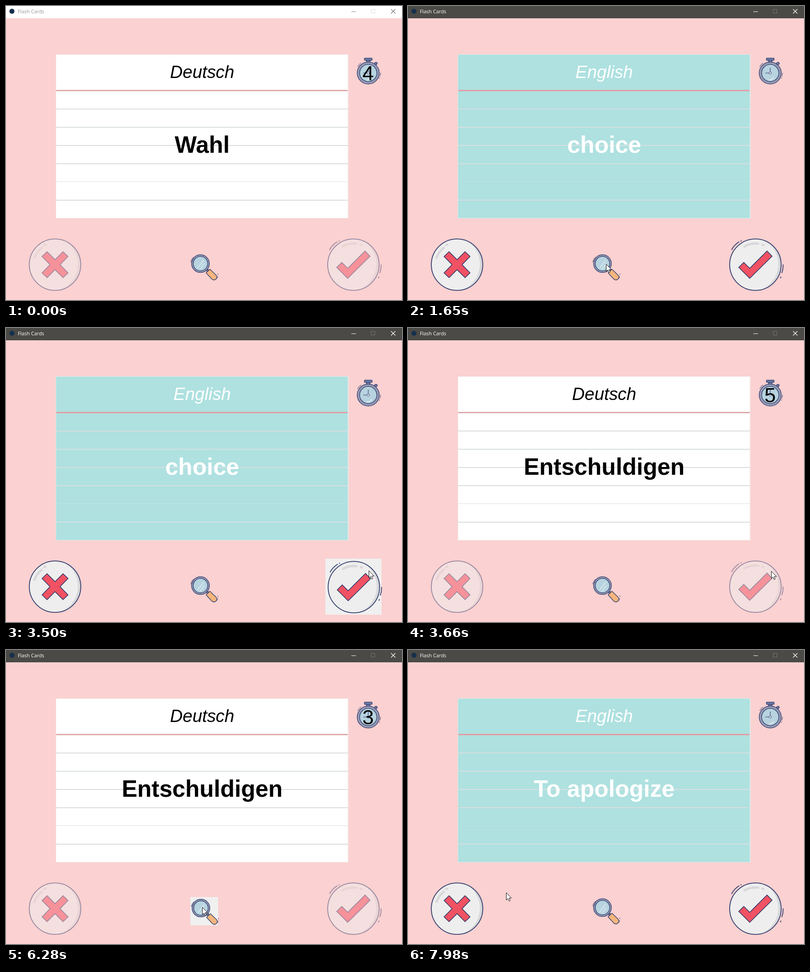
Write an HTML page that moves like this. It is 868x645 px and loops after 8 s.

```html
<!DOCTYPE html>
<html lang="en">
<head>
<meta charset="utf-8">
<title>Flash Cards</title>
<style>
  html, body { margin: 0; width: 100%; height: 100%; overflow: hidden; background: #fbd1d1; }
  svg { display: block; width: 100%; height: 100%; }
  text { font-family: "Liberation Sans", Arial, sans-serif; text-anchor: middle; }
  #caption { font: 10.8px "Open Sans", "Noto Sans", sans-serif; text-anchor: start; }
  #lang { font-size: 38.4px; font-style: italic; }
  #word { font-size: 51.2px; font-weight: bold; }
  #count { font-size: 44.8px; }
  .crisp { shape-rendering: crispEdges; }
  .ink { stroke: #303c6c; stroke-linecap: round; stroke-linejoin: round; }
  .line { fill: none; }
</style>
</head>
<body>
<svg viewBox="0 0 868 645" preserveAspectRatio="none">
  <defs>
    <pattern id="stipple" width="2" height="2" patternUnits="userSpaceOnUse" patternTransform="scale(.96)">
      <path d="M0 0h1v1h1v1h-1v-1h-1z" fill="#fbd1d1"/>
    </pattern>
    <g id="disc">
      <circle r="56.4" fill="#eeeeee"/>
      <path d="M24-51A56.4 56.4 0 0 1 10 55.5A60.2 60.2 0 0 0 24-51z" fill="#d8d8db"/>
      <circle class="ink line" r="56.4" stroke-width="1.8"/>
    </g>
  </defs>

  <rect width="868" height="645" fill="#fbd1d1"/>

  <rect id="bar" class="crisp" width="868" height="27"/>
  <circle cx="13" cy="11.5" r="5.5" fill="#15304c"/>
  <text id="caption" x="26" y="16.4">Flash Cards</text>
  <path id="min" class="crisp" d="M757 12.5h10" fill="none"/>
  <path id="max" class="crisp" d="M800.5 7.5h8v8h-8z" fill="none"/>
  <path id="close" d="M844 7l9.5 9.5M853.5 7l-9.5 9.5" fill="none" stroke-width="1.2"/>

  <g class="crisp">
    <rect id="edge" x="109" y="106" width="642" height="360"/>
    <rect id="card" x="110" y="107" width="639" height="358"/>
    <rect id="rule" x="110" y="184" width="639" height="3"/>
    <path id="rows" d="M110 226h639m-639 40h639m-639 40h639m-639 40h639m-639 80h639" stroke-width="2"/>
    <path id="faint" d="M110 385.5h639" stroke-width="1"/>
  </g>
  <text id="lang" x="430" y="158.2"></text>
  <text id="word" x="430" y="322.2"></text>

  <g class="ink" stroke-width="1.3">
    <path d="M790 118h8v6h-8z" fill="#7780a5"/>
    <rect x="785.5" y="114.5" width="17" height="4.5" rx="1" fill="#7587b0"/>
    <path d="M806 128l3-4q4-2 5 2l-4 5z" fill="#7780a5"/>
    <circle cx="794" cy="147" r="24.2" fill="#969bb5"/>
    <circle cx="794" cy="147" r="18.8" fill="#b7d3df"/>
    <path class="line" d="M794 147v-11.5M794 147h-10.5" stroke-width="1.1"/>
    <circle cx="794" cy="147" r="2.4" fill="#fff" stroke-width="1"/>
    <path class="line" d="M791 162q8 0 11-6" style="stroke:#eef5f8" stroke-width="1.4"/>
    <path class="line" d="M771 133q2-5 7-8M773.5 134q2-4 5-6M821 147q0 4-1.5 7M819 157l-1 2" stroke-width="1"/>
  </g>
  <text id="count" x="793.6" y="163"></text>

  <g transform="translate(107.5 567.5)">
    <use href="#disc"/>
    <path class="line" d="M-45-15Q-40-29-29-37M-23.5-43l2-1" stroke="#d8d8db" stroke-width="5" stroke-linecap="round"/>
    <path class="ink" d="M-28.5-18L-17.5-28.5L0-11L17.5-28.5L28.5-18L11 0L28.5 18L17.5 28.5L0 11L-17.5 28.5L-28.5 18L-11 0z" fill="#f15263" stroke-width="1.7"/>
  </g>

  <rect id="okBox" class="crisp" x="700" y="506" width="123" height="123" fill="#f0f0f0"/>
  <g id="ok">
    <use href="#disc"/>
    <path class="line" d="M-24-40Q-10-48 6-46M15.5-44l2 1" stroke="#d8d8db" stroke-width="5" stroke-linecap="round"/>
    <path class="ink" d="M-36.5 6L-25.5-5L-12.5 8L25.5-30L36.5-18.5L-12.5 30z" fill="#f15263" stroke-width="1.7"/>
    <path class="ink line" d="M-52-33Q-46-44-36-50M-32-52l1-.5M60.8 0Q61 10 58 18M56 27l-1 2" stroke-width="1.7"/>
  </g>

  <g id="off" fill="url(#stipple)">
    <rect x="46" y="506" width="123" height="123"/>
    <rect x="700" y="506" width="124" height="123"/>
  </g>

  <rect id="lensBox" class="crisp" x="404" y="542" width="61" height="62" fill="#f0f0f0"/>
  <g id="lens" class="ink" stroke-width="1.3">
    <path d="M439 580l3-3 5 5-3 3z" fill="#7780a5"/>
    <path d="M438.5 585.5L447 577.5L460 590Q464 595 460.500 599Q456 603 451 599z" fill="#f5b57d"/>
    <circle cx="426.300" cy="565.200" r="19.500" fill="#969bb5"/>
    <circle cx="426.300" cy="565.200" r="15.800" fill="#b7d3df"/>
    <path class="line" d="M420 575l13-17M426 577l9-12" style="stroke:#d9e8ee" stroke-width="2"/>
    <path class="line" d="M405 562q1-7 6-11M408 560q1-4 3-6M464.500 587.500v2M464 593q0 3-2 5" stroke-width=".9"/>
  </g>

  <path id="cursor" d="M.5.5V16.500L4 13.200L6.500 18.800L9 17.700L6.600 12.200H11.600z" fill="#fff" stroke="#111" stroke-width="1"/>
</svg>

<script>
const LOOP = 8000, START = 560, STEP = 77.25;
const $ = id => document.getElementById(id);
const set = (id, attrs) => { for (const k in attrs) $(id).setAttribute(k, attrs[k]); };
const show = (id, on) => set(id, { visibility: on ? 'visible' : 'hidden' });
const within = (t, a, b) => t >= a && t < b;

// Pointer stops: time, x, y
const stops = [
  [480, 380, 655], [1330, 434, 566], [2575, 434, 566], [2960, 154, 562],
  [3420, 795, 534], [3495, 795, 532], [3800, 797, 534], [4195, 797, 534],
  [4800, 422, 569], [4880, 428, 568], [5265, 428, 568], [5340, 430, 568],
  [5420, 430, 568], [5570, 430, 564], [6580, 430, 564], [6730, 431, 564],
  [7440, 431, 564], [7970, 215, 532]
];

const front = { edge: '#f2e6e6', card: '#ffffff', rule: '#dfa9a9', rows: '#dadddd', faint: '#dfe1e1', ink: '#000', lang: 'Deutsch' };
const back = { edge: '#dcebea', card: '#aee1e0', rule: '#e59ca3', rows: '#d8dee0', faint: '#bee5e4', ink: '#fff', lang: 'English' };

// Start time, side, word, times at which the counter drops
const cards = [
  [0, front, 'Wahl', 4, [950]],
  [1650, back, 'choice'],
  [3580, front, 'Entschuldigen', 5, [4580, 5580]],
  [6430, back, 'To apologize']
];

function pointerAt(t) {
  const q = START + STEP * Math.floor((t - START) / STEP);
  if (q <= stops[0][0]) return [380, 700];
  const i = stops.findIndex(s => s[0] > q);
  if (i < 0) return stops[stops.length - 1].slice(1);
  const a = stops[i - 1], b = stops[i];
  const u = (q - a[0]) / (b[0] - a[0]), e = u * u * (3 - 2 * u);
  return [1, 2].map(k => Math.round(a[k] + (b[k] - a[k]) * e));
}

function drawBar(active) {
  set('bar', { fill: active ? '#4b4a46' : '#ffffff' });
  set('caption', { fill: active ? '#ffffff' : '#969696' });
  set('min', { stroke: active ? '#ffffff' : '#8e8e8e' });
  set('max', { stroke: active ? '#777672' : '#dedede' });
  set('close', { stroke: active ? '#ffffff' : '#777777' });
}

function drawCard(t) {
  const [, side, word, from, ticks] = cards.filter(c => c[0] <= t).pop();
  for (const id of ['edge', 'card', 'rule']) set(id, { fill: side[id] });
  for (const id of ['rows', 'faint']) set(id, { stroke: side[id] });
  for (const id of ['lang', 'word']) set(id, { fill: side.ink });
  $('lang').textContent = side.lang;
  $('word').textContent = word;
  $('count').textContent = ticks ? from - ticks.filter(x => x <= t).length : '';
  show('off', side === front);
}

function draw(t) {
  drawBar(t >= 1570);
  drawCard(t);

  const okDown = within(t, 3430, 3580);
  show('okBox', okDown);
  set('ok', { transform: okDown ? 'translate(762.5 568.5)' : 'translate(761.5 567.5)' });

  const lensDown = within(t, 1570, 1650) || within(t, 6280, 6430);
  show('lensBox', lensDown);
  set('lens', { transform: lensDown ? 'translate(1 1)' : 'translate(0 0)' });

  set('cursor', { transform: `translate(${pointerAt(t)})` });
}

const t0 = performance.now();
function tick() {
  draw((performance.now() - t0) % LOOP);
  requestAnimationFrame(tick);
}
tick();
</script>
</body>
</html>
```
